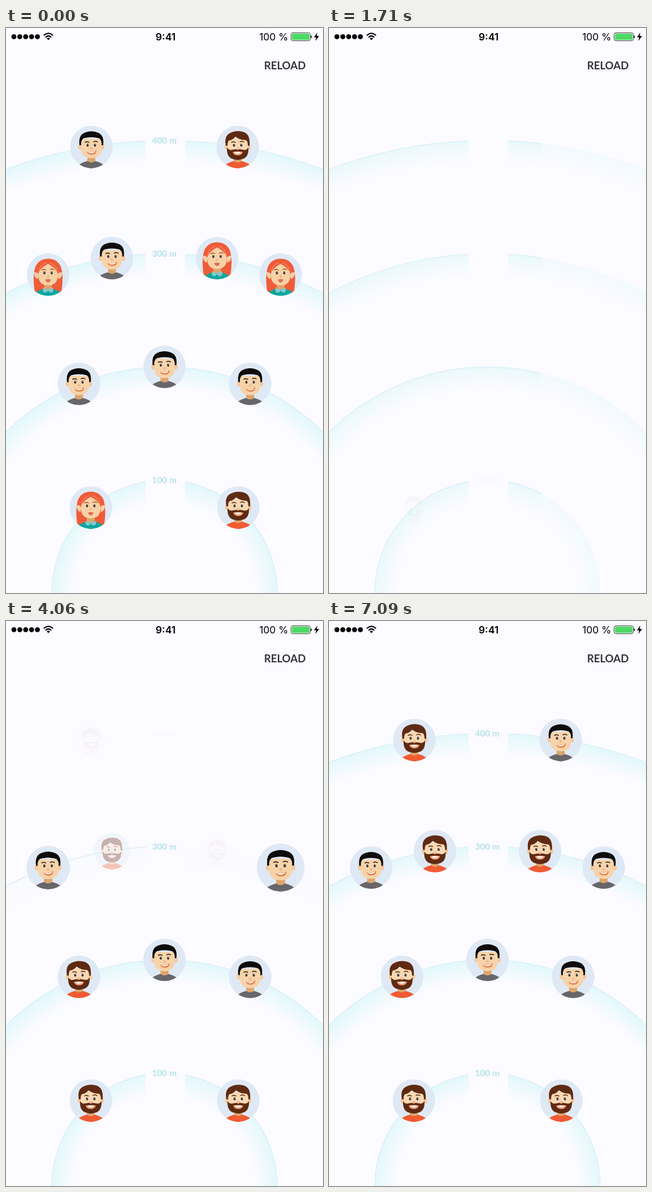
An HTML page with a canvas for the animation above (8000 ms loop, 561 by 998 pixels).

```html
<!DOCTYPE html>
<html lang="en">
<head>
<meta charset="utf-8">
<title>Nearby radar</title>
<style>
  html, body { margin: 0; width: 100%; height: 100%; overflow: hidden; background: #fcfbff; }
  canvas { display: block; }
</style>
</head>
<body>
<canvas id="stage" width="561" height="998"></canvas>
<script>
const W = 561, H = 998, LOOP = 8000;
const CX = 280.5, CY = 998;
const BG = '#fcfbff';
const stage = document.getElementById('stage').getContext('2d');
const clamp = v => Math.max(0, Math.min(1, v));
const ramp = (t, from, to) => clamp((t - from) / (to - from));

// Each seat: x, y, first face, next face, time the next face appears.
const rings = [
  { r: 200, label: '100 m', color: '#b4e3e7', start: 1690, seats: [
    [150, 847, 'woman', 'beard', 1700], [411, 847, 'beard', 'beard', 1960]] },
  { r: 400, start: 2375, seats: [
    [129, 628.5, 'man', 'beard', 2380], [280.5, 598.5, 'man', 'man', 2580], [432, 628.5, 'man', 'man', 2960]] },
  { r: 600, label: '300 m', color: '#b5e0ee', start: 3220, seats: [
    [74.5, 435.5, 'woman', 'man', 3220], [187.5, 406.5, 'man', 'beard', 3890],
    [373.5, 406.5, 'woman', 'beard', 4045], [486, 435.5, 'woman', 'man', 3500]] },
  { r: 800, label: '400 m', color: '#b4e3e7', start: 4045, seats: [
    [151, 210, 'man', 'beard', 4045], [410, 210, 'beard', 'man', 4190]] }
];

/* ---------- faces ---------- */

function painter(g) {
  const ellipse = (color, x, y, rx, ry = rx, turn = 0) => {
    g.fillStyle = color;
    g.beginPath();
    g.ellipse(x, y, rx, ry, turn, 0, 7);
    g.fill();
  };
  const shape = (color, d) => { g.fillStyle = color; g.fill(new Path2D(d)); };
  const line = (color, width, d) => {
    g.strokeStyle = color;
    g.lineWidth = width;
    g.lineCap = 'round';
    g.stroke(new Path2D(d));
  };
  return { ellipse, shape, line };
}

function eyes({ ellipse, line }, brow) {
  for (const x of [-6.5, 6.5]) {
    ellipse('#2b2b33', x, -3, 1.9, 2.6);
    ellipse('#ffffff', x + .5, -4, .6);
  }
  line(brow, 1.4, 'M-11-8Q-8-10-4-8M4-9Q8-11 11-8.5');
}

function smile({ shape }) {
  shape('#e8834f', 'M-8 9Q0 10 9 6Q9 14 1 14Q-6 14-8 9Z');
  shape('#ffffff', 'M-6 9.3Q1 10 7 7.2Q6 11 0 11.2Q-4 11-6 9.3Z');
}

function body({ shape }, shirt) {
  shape('#dda56c', 'M-7 13H7V25Q0 31-7 25Z');
  shape(shirt, 'M-26 38Q-23 29-7 25Q0 30 7 25Q23 29 26 38Z');
}

const faces = {
  man(p) {
    body(p, '#676669');
    p.ellipse('#f3c99c', -20, 0, 3.3, 5);
    p.ellipse('#f3c99c', 20, 0, 3.3, 5);
    p.shape('#f7d3aa', 'M-18-14H18V4Q17 20 0 20Q-17 20-18 4Z');
    p.shape('#0d0b0b', 'M-21-3Q-23-19-14-24Q0-31 14-24Q23-19 21-3L18-3Q19-11 14-15Q0-19-14-15Q-19-11-18-3Z');
    eyes(p, '#17130f');
    p.ellipse('#efbb8d', 0, 3, 2.2, 2.6);
    smile(p);
  },
  beard(p) {
    body(p, '#f05b33');
    p.ellipse('#f3c99c', -20, 0, 3.3, 5);
    p.ellipse('#f3c99c', 20, 0, 3.3, 5);
    p.shape('#f9d8b3', 'M-18-15H18V8Q14 18 0 18Q-14 18-18 8Z');
    p.shape('#5f2a12', 'M-19 1Q-15 7-9 5Q0 3 9 5Q15 7 19 1Q20 20 6 22Q0 24-6 22Q-20 20-19 1Z');
    p.shape('#5f2a12', 'M-21-2Q-24-17-16-23Q-5-30 8-27Q23-24 21-2L18-2Q18-11 14-12Q4-12-4-18Q-9-12-16-11Q-18-8-18-2Z');
    eyes(p, '#4b200d');
    p.ellipse('#efbb8d', 0, 3, 2.2, 2.6);
    p.shape('#f3a27c', 'M-9 9Q0 7 9 9Q7 15 0 15Q-7 15-9 9Z');
    p.shape('#ffffff', 'M-6 9.5Q0 8.5 6 9.5Q4 12 0 12Q-4 12-6 9.5Z');
  },
  woman(p) {
    p.shape('#ef5c39', 'M-24 28Q-28 0-22-15Q-15-28 0-28Q15-28 22-15Q28 0 24 28Q20 34 12 34H-12Q-20 34-24 28Z');
    body(p, '#0aa69d');
    p.shape('#f6cfa5', 'M-18 8Q-25 6-25-4Q-19-5-17 0ZM18 8Q25 6 25-4Q19-5 17 0Z');
    p.shape('#f7d1a6', 'M0-21Q-16-17-17-3Q-19 19 0 19Q19 19 17-3Q16-17 0-21Z');
    p.shape('#ef5c39', 'M0-24Q-16-20-18 0Q-15-11 0-19Q15-11 18 0Q16-20 0-24Z');
    p.line('#f5a078', .8, 'M-3-21Q-14-17-17-5M3-21Q14-17 17-5');
    eyes(p, '#a9502e');
    p.ellipse('#efb887', 0, 3, 1.8, 2.4);
    p.shape('#de704f', 'M-5 9Q0 7 5 9Q3 14 0 14Q-3 14-5 9Z');
    p.shape('#7ccbd0', 'M-9 24Q-3 24 0 28Q3 24 9 24Q11 31 5 32Q1 31 0 28Q-1 31-5 32Q-11 31-9 24Z');
  }
};

const RADIUS = 37.5;

function renderFace(draw) {
  const canvas = document.createElement('canvas');
  canvas.width = canvas.height = 150;
  const g = canvas.getContext('2d');
  g.scale(2, 2);
  g.translate(RADIUS, RADIUS);
  g.beginPath();
  g.arc(0, 0, RADIUS, 0, 7);
  g.clip();
  g.fillStyle = '#dfe9f5';
  g.fillRect(-RADIUS, -RADIUS, 75, 75);
  draw(painter(g));
  return canvas;
}

const sprites = Object.fromEntries(Object.entries(faces).map(([name, draw]) => [name, renderFace(draw)]));

function drawFace(name, x, y, alpha, scale = 1) {
  if (alpha <= 0) return;
  const r = RADIUS * scale;
  stage.globalAlpha = alpha;
  stage.drawImage(sprites[name], x - r, y - r, 2 * r, 2 * r);
  stage.globalAlpha = 1;
}

/* ---------- rings and text ---------- */

function drawBand(r, x0, x1, alpha, outlined) {
  if (x1 <= x0) return;
  stage.save();
  stage.beginPath();
  stage.rect(x0, 0, x1 - x0, H);
  stage.clip();
  const glow = stage.createRadialGradient(CX, CY, r - 40, CX, CY, r);
  glow.addColorStop(0, 'rgba(205,246,249,0)');
  glow.addColorStop(1, 'rgba(205,246,249,.55)');
  stage.globalAlpha = alpha;
  stage.lineWidth = 40;
  stage.strokeStyle = glow;
  stage.beginPath();
  stage.arc(CX, CY, r - 20, Math.PI, 0);
  stage.stroke();
  if (outlined) {
    stage.globalAlpha = 1;
    stage.lineWidth = 1.5;
    stage.strokeStyle = '#dcf0f7';
    stage.beginPath();
    stage.arc(CX, CY, r - .7, Math.PI, 0);
    stage.stroke();
  }
  stage.restore();
}

// The outline reaches from the left to `edge`; the glow is weaker beyond it.
function drawRing(ring, alpha, edge) {
  const spans = ring.label ? [[0, 247], [317, W]] : [[0, W]];
  for (const [a, b] of spans) {
    const cut = Math.max(a, Math.min(b, edge));
    drawBand(ring.r, a, cut, alpha, true);
    drawBand(ring.r, cut, b, alpha * .6, false);
  }
}

function text(string, x, y, font, color, align) {
  stage.font = font;
  stage.fillStyle = color;
  stage.textAlign = align;
  stage.fillText(string, x, y);
}

function drawLabel(ring, alpha) {
  if (!ring.label) return;
  stage.globalAlpha = alpha;
  text(ring.label, 280, CY - ring.r + 6, '700 15.5px Lato, sans-serif', ring.color, 'center');
  stage.globalAlpha = 1;
}

function drawStatusBar() {
  const { ellipse, shape, line } = painter(stage);
  for (let i = 0; i < 5; i++) ellipse('#000', 14 + i * 10.4, 15.3, 4.4);
  line('#000', 2.2, 'M67.5 12.6Q75 6 82.5 12.6M70.5 16Q75 12 79.5 16');
  shape('#000', 'M72 18.3Q75 16 78 18.3L75 21.5Z');
  text('9:41', 282.5, 21.5, '600 17.5px Inter, sans-serif', '#000', 'center');
  text('100 %', 499.5, 22, '400 17.5px Inter, sans-serif', '#000', 'right');
  stage.lineWidth = 1;
  stage.strokeStyle = '#333';
  stage.beginPath();
  stage.roundRect(504.5, 8.5, 34, 14, 3);
  stage.stroke();
  stage.fillStyle = '#4cd964';
  stage.beginPath();
  stage.roundRect(506, 10, 31, 11, 1.5);
  stage.fill();
  shape('#222', 'M539.5 13Q541.5 13 541.5 15.5Q541.5 18 539.5 18Z');
  shape('#000', 'M551 8L545 16.5H549L547.5 23L554 14H549.8Z');
  text('RELOAD', 530.5, 73, '700 18.7px Lato, sans-serif', '#333337', 'right');
}

/* ---------- timeline ---------- */

function drawLeaving(t) {
  const faceAlpha = 1 - ramp(t, 560, 1360) ** 2;
  const labelAlpha = 1 - ramp(t, 950, 1500);
  const glowAlpha = 1 - ramp(t, 1380, 2140) ** 1.4;
  const edge = W * (1 - ramp(t, 1500, 2140));
  for (const ring of rings) {
    drawRing(ring, glowAlpha, edge);
    drawLabel(ring, labelAlpha);
    for (const [x, y, face] of ring.seats) drawFace(face, x, y, faceAlpha);
  }
}

function drawArriving(t) {
  // The last ring arrives at a quicker pace.
  const clock = t + .65 * Math.max(0, t - 4060);
  for (const ring of rings) {
    const age = clock - ring.start;
    if (age <= 0) continue;
    drawRing(ring, ramp(age, 800, 1100), W * ramp(age, 560, 1120));
    drawLabel(ring, ramp(age, 0, 250));
    for (const [x, y, , face, start] of ring.seats) {
      const grow = ramp(clock - start, 0, 500);
      const settle = ramp(clock - start, 500, 900);
      drawFace(face, x, y, grow, .7 + .45 * grow - .15 * settle);
    }
  }
}

function frame(now) {
  const t = now % LOOP;
  stage.fillStyle = BG;
  stage.fillRect(0, 0, W, H);
  if (t < 2140) drawLeaving(t);
  drawArriving(t);
  drawStatusBar();
  requestAnimationFrame(frame);
}
requestAnimationFrame(frame);
</script>
</body>
</html>
```
